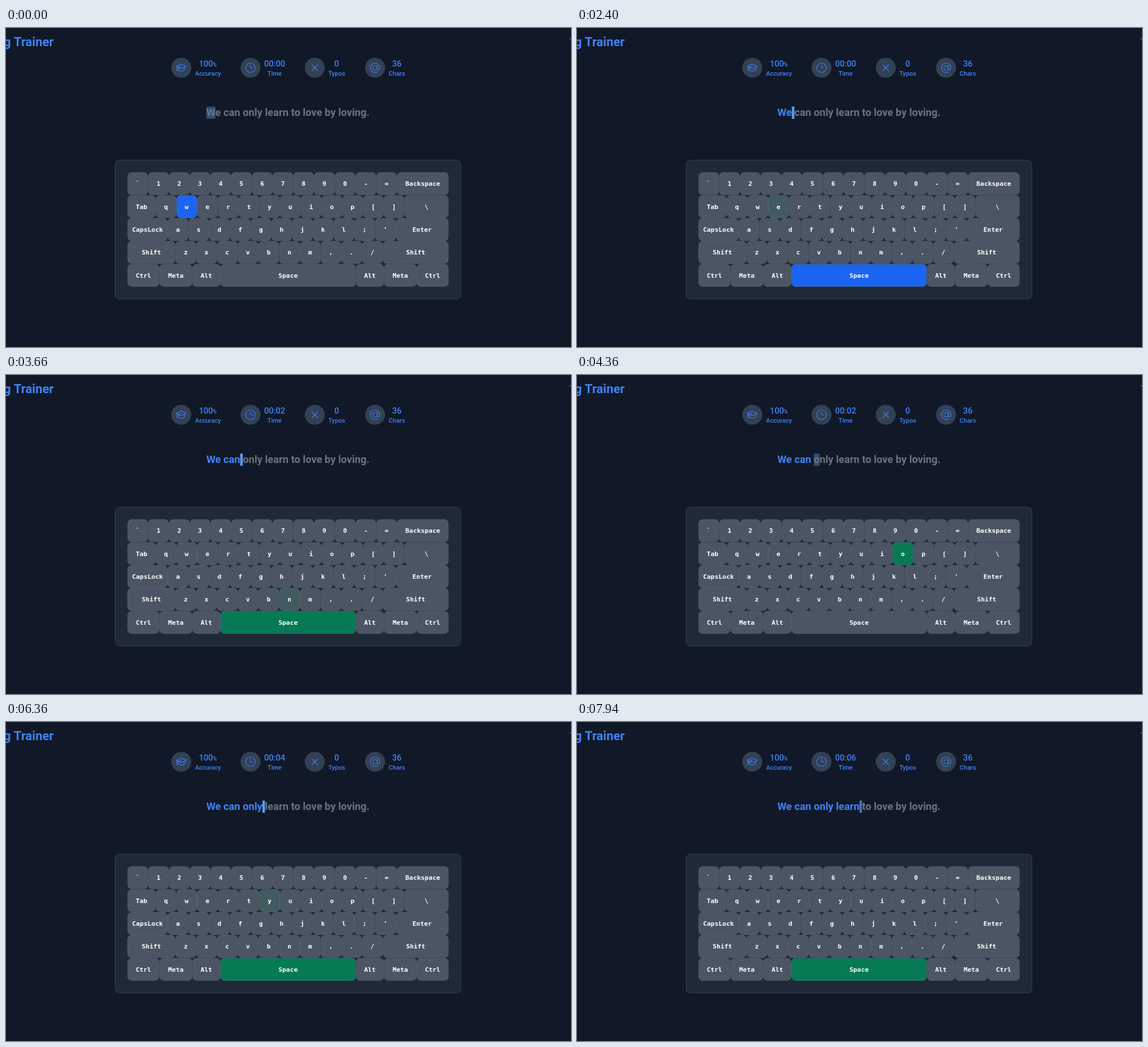
An HTML page with a canvas for the animation above (8000 ms loop, 996 px wide and 562 px high).

```html
<!DOCTYPE html>
<html lang="en">
<head>
<meta charset="utf-8">
<title>Typing trainer</title>
<style>
html, body { margin: 0; width: 100%; height: 100%; overflow: hidden; background: #111827; }
canvas { display: block; width: 996px; height: 562px; }
</style>
</head>
<body>
<canvas id="stage" width="996" height="562"></canvas>
<script>
const ctx = document.getElementById('stage').getContext('2d');
const LOOP = 8000;
const SANS = 'Roboto, sans-serif';
const MONO = '"DejaVu Sans Mono", monospace';
const BLUE = '#3f83f8';
const GRAY_KEY = [75, 85, 99], BLUE_KEY = [28, 100, 242], GREEN_KEY = [5, 122, 85];
const SENTENCE = 'We can only learn to love by loving.';

// key, pressed at, released at (the cursor moves on release)
const STROKES = [
  ['w', 1300, 1600], ['e', 2110, 2225], [' ', 2620, 2700], ['c', 2900, 2980],
  ['a', 3160, 3250], ['n', 3410, 3490], [' ', 3620, 3720], ['o', 4310, 4400],
  ['n', 4690, 4780], ['l', 5880, 5970], ['y', 6110, 6190], [' ', 6320, 6400],
  ['l', 6540, 6620], ['e', 6890, 6890], ['a', 7040, 7120], ['r', 7250, 7330],
  ['n', 7400, 7485], [' ', 7930, 9000]
];
const SHIFT = [1080, 1300, 1760];
const FADE = 300;

function bezier(x1, x2) {
  return x => {
    let lo = 0, hi = 1, s = x;
    for (let i = 0; i < 20; i++) {
      s = (lo + hi) / 2;
      const v = 3 * (1 - s) * (1 - s) * s * x1 + 3 * (1 - s) * s * s * x2 + s * s * s;
      if (v < x) lo = s; else hi = s;
    }
    return s * s * (3 - 2 * s);
  };
}
const fadeEase = bezier(0.4, 0.2);
const pulseEase = bezier(0.4, 0.6);

const mix = (a, b, p) => a.map((v, i) => Math.round(v + (b[i] - v) * p));
const rgb = c => `rgb(${c.join(',')})`;
const fadeOut = (from, age) => mix(from, GRAY_KEY, fadeEase(Math.min(1, age / FADE)));

function keyColor(id, t) {
  if (id === 'ShiftLeft') {
    if (t < SHIFT[0]) return GRAY_KEY;
    return t < SHIFT[1] ? GREEN_KEY : fadeOut(GREEN_KEY, t - SHIFT[1]);
  }
  let color = GRAY_KEY;
  STROKES.forEach(([key, down, up], i) => {
    const from = i ? STROKES[i - 1][2] : 0;
    if (key !== id || t < from) return;
    if (t < down) color = BLUE_KEY;
    else if (t < up) color = GREEN_KEY;
    else color = fadeOut(up > down ? GREEN_KEY : BLUE_KEY, t - up);
  });
  return color;
}

// Keyboard layout
const LEFT = 214, RIGHT = 780.2, PITCH = 36.55, TOP = 254.2, ROW = 40.35;
const keys = [];
function addKey(row, x0, x1, id, low, high = low) {
  keys.push({ x: x0, y: TOP + row * ROW, w: x1 - x0, id, low, high });
}
function addRow(row, start, low, high, first, last) {
  if (first) addKey(row, LEFT, start, first + 'Left', first);
  [...low].forEach((c, i) =>
    addKey(row, start + i * PITCH, start + (i + 1) * PITCH, c, c, high[i]));
  const end = start + low.length * PITCH;
  if (last.length > 1) addKey(row, end, RIGHT, last + 'Right', last);
  else addKey(row, end, RIGHT, last, last, '|');
}
addRow(0, LEFT, '`1234567890-=', '~!@#$%^&*()_+', '', 'Backspace');
addRow(1, 263.7, 'qwertyuiop[]', 'QWERTYUIOP{}', 'Tab', '\\');
addRow(2, 284.9, "asdfghjkl;'", 'ASDFGHJKL:"', 'CapsLock', 'Enter');
addRow(3, 298.6, 'zxcvbnm,./', 'ZXCVBNM<>?', 'Shift', 'Shift');
const edges = [LEFT, 270.6, 328.2, 378, 616.5, 666.2, 723.8, RIGHT];
['Ctrl', 'Meta', 'Alt', 'Space', 'Alt', 'Meta', 'Ctrl'].forEach((name, i) =>
  addKey(4, edges[i], edges[i + 1], name === 'Space' ? ' ' : name + i, name));

function text(str, x, y, font, color, align = 'center') {
  ctx.font = font;
  ctx.fillStyle = color;
  ctx.textAlign = align;
  ctx.fillText(str, x, y);
}

function box(x, y, w, h, r, fill, stroke) {
  ctx.beginPath();
  ctx.roundRect(x, y, w, h, r);
  ctx.fillStyle = fill;
  ctx.fill();
  ctx.strokeStyle = stroke;
  ctx.lineWidth = 1;
  ctx.stroke();
}

function drawKeyboard(t) {
  box(192.5, 232.9, 609.3, 244.3, 7, '#1f2937', '#374151');
  const upper = t >= SHIFT[0] && t < SHIFT[2];
  for (const k of keys) {
    const c = keyColor(k.id, t);
    const lit = c !== GRAY_KEY;
    box(k.x + 0.7, k.y + 0.6, k.w - 1.2, ROW - 1.3, 6.5, rgb(c),
      lit ? rgb(mix(c, [107, 114, 128], 0.55)) : '#535c6a');
    text(upper ? k.high : k.low, k.x + k.w / 2, k.y + 24, `bold 11.3px ${MONO}`, '#fff');
  }
}

function line(...p) {
  ctx.moveTo(p[0], p[1]);
  for (let i = 2; i < p.length; i += 2) ctx.lineTo(p[i], p[i + 1]);
}

const icons = [
  () => {
    line(-9, -2.5, 0, -6.5, 9, -2.5, 0, 1.5, -9, -2.5);
    line(-5.5, -1, -5.5, 4);
    ctx.quadraticCurveTo(0, 8, 5.5, 4);
    ctx.lineTo(5.5, -1);
    line(0, -2.5, -7.5, 0.5, -7.5, 5.5);
  },
  () => {
    ctx.arc(0, 0, 8.3, 0, 7);
    line(0, -5, 0, 0, 4, 0);
  },
  () => {
    line(-5, -5, 5, 5);
    line(5, -5, -5, 5);
  },
  () => {
    ctx.arc(0, 0, 3.8, 0, 7);
    line(3.8, -4, 3.8, 1.5);
    ctx.bezierCurveTo(3.8, 5, 8.3, 4.5, 8.3, 0);
    ctx.arc(0, 0, 8.3, 0, 1.05, true);
  }
];

function drawStat(i, cx, tx, value, label) {
  ctx.save();
  ctx.translate(cx, 70);
  ctx.beginPath();
  ctx.arc(0, 0, 17.6, 0, 7);
  ctx.fillStyle = '#334155';
  ctx.fill();
  ctx.beginPath();
  icons[i]();
  ctx.strokeStyle = BLUE;
  ctx.lineWidth = 1.1;
  ctx.lineJoin = ctx.lineCap = 'round';
  ctx.stroke();
  ctx.restore();
  if (value === '100') {
    text(value, 340, 68, `500 14.6px ${SANS}`, BLUE, 'left');
    text('%', 364.3, 68, `500 10px ${SANS}`, BLUE, 'left');
  } else text(value, tx, 68, `500 14.6px ${SANS}`, BLUE);
  text(label, tx, 83.5, `500 11px ${SANS}`, BLUE);
}

function drawSentence(t) {
  const done = STROKES.filter(s => t >= s[2]).length;
  const start = done ? STROKES[done - 1][2] : -1350;
  const phase = ((t - start) % 2000) / 1000;
  const dim = pulseEase(phase < 1 ? phase : 2 - phase);
  const font = `600 18.28px ${SANS}`;
  ctx.font = font;
  const at = n => ctx.measureText(SENTENCE.slice(0, n)).width;
  const x = 497 - at(SENTENCE.length) / 2;
  const a = x + at(done), b = x + at(done + 1);
  ctx.fillStyle = `rgba(96,165,250,${1 - 0.85 * dim})`;
  ctx.fillRect(a, 138.5, b - a, 21.5);
  text(SENTENCE.slice(0, done), x, 155, font, BLUE, 'left');
  text(SENTENCE.slice(done), a, 155, font, '#6b7280', 'left');
}

function draw(t) {
  ctx.fillStyle = '#111827';
  ctx.fillRect(0, 0, 996, 562);
  text('g Trainer', 84, 31.5, `600 21.9px ${SANS}`, BLUE, 'right');
  ctx.fillRect(993, 18.5, 3, 1.2);
  const secs = Math.max(0, Math.floor((t - 1595) / 1030));
  drawStat(0, 309, 356, '100', 'Accuracy');
  drawStat(1, 431, 473.5, '00:0' + secs, 'Time');
  drawStat(2, 544.3, 583, '0', 'Typos');
  drawStat(3, 650.6, 689, '36', 'Chars');
  drawSentence(t);
  drawKeyboard(t);
}

const begin = performance.now();
function tick() {
  draw((performance.now() - begin) % LOOP);
  requestAnimationFrame(tick);
}
tick();
</script>
</body>
</html>
```
